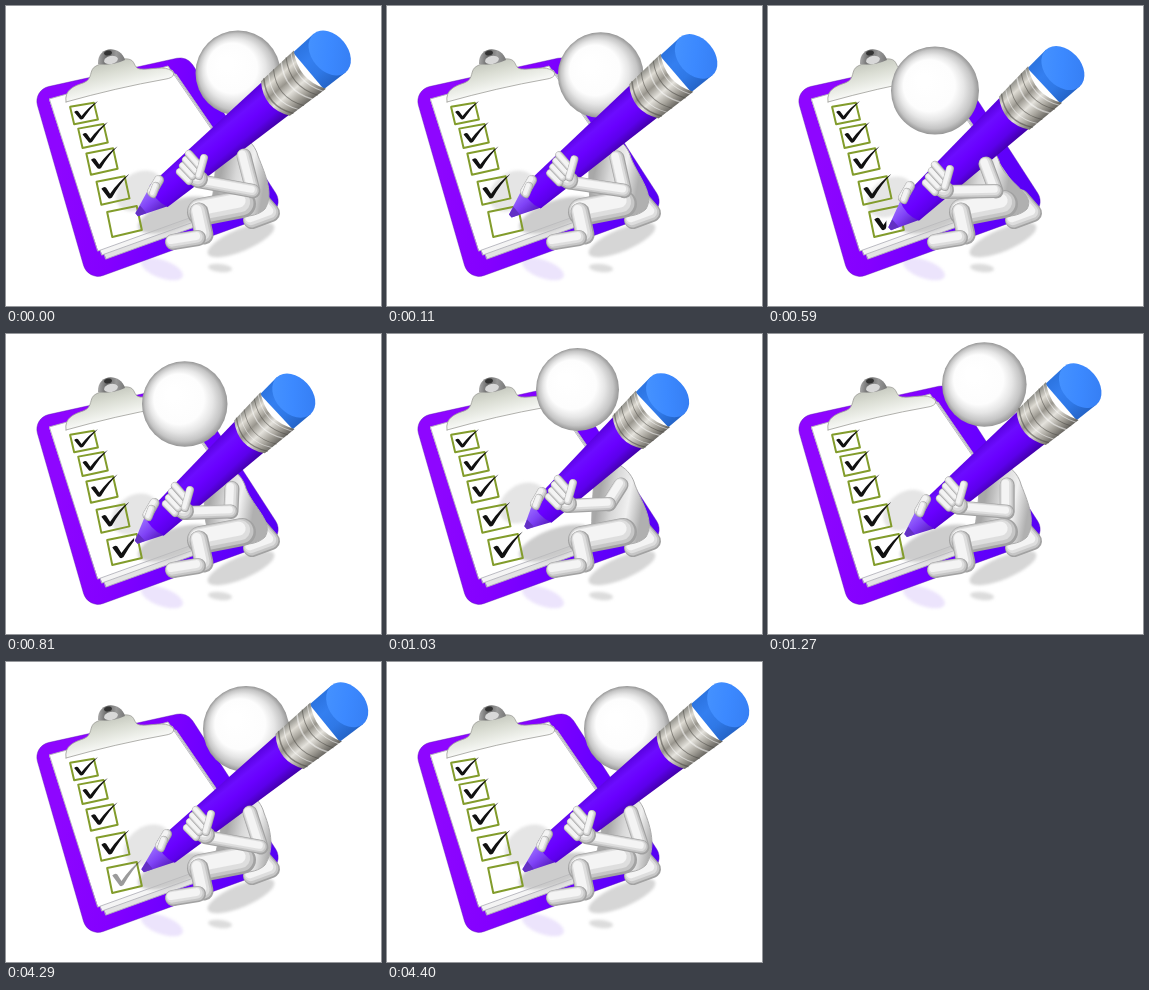
These frames come from a looping animation (375 by 300 pixels, 6.4 s). An HTML page with a canvas:

```html
<!DOCTYPE html>
<html lang="en">
<head>
<meta charset="utf-8">
<title>Checklist</title>
<style>
html, body { margin: 0; width: 100%; height: 100%; overflow: hidden; background: #fff; }
canvas { display: block; width: 375px; height: 300px; }
</style>
</head>
<body>
<canvas id="stage" width="375" height="300"></canvas>
<script>
const ctx = document.getElementById('stage').getContext('2d');
const LOOP = 6400;
const STEPS = [0, 110, 220, 330, 480, 590, 700, 810, 920, 1030, 1160, 1270, 1380, 1490, 4290, 4400];

// head is x, y, radius; every other part is a point
const POSES = [
  { t: 0, tip: [130, 208], eraser: [315, 53], head: [232, 67, 42.5], hand: [184, 160], grip: [149, 180], shoulder: [234, 142], elbow: [247, 185] },
  { t: 330, tip: [108, 212], eraser: [272, 63], head: [177, 73.5, 43.5], hand: [152, 164], grip: [125, 180], shoulder: [210, 148], elbow: [218, 184] },
  { t: 590, tip: [121, 222], eraser: [287, 68], head: [167, 84.5, 44], hand: [168, 171], grip: [138, 186], shoulder: [214, 150], elbow: [228, 185] },
  { t: 1030, tip: [138, 193], eraser: [274, 66], head: [190.5, 55.5, 41.5], hand: [172, 157], grip: [151, 164], shoulder: [230, 143], elbow: [222, 170] },
  { t: 1490, tip: [136, 208], eraser: [332, 49], head: [240, 67, 43], hand: [191, 160], grip: [157, 178], shoulder: [240, 143], elbow: [255, 185] }
];

const mix = (a, b, k) => a + (b - a) * k;
const clamp = v => Math.max(0, Math.min(1, v));

function poseAt(t) {
  const last = POSES.length - 1;
  let i = 0;
  while (i < last - 1 && t >= POSES[i + 1].t) i++;
  const a = POSES[i], b = POSES[i + 1];
  const k = clamp((t - a.t) / (b.t - a.t));
  const pose = {};
  for (const part in a) {
    if (part !== 't') pose[part] = a[part].map((v, n) => mix(v, b[part][n], k));
  }
  // the head rises while the figure leans back
  if (i === last - 1) pose.head[1] -= 11 * Math.sin(Math.PI * k);
  return pose;
}

function gradient(x0, y0, x1, y1, ...colors) {
  const g = ctx.createLinearGradient(x0, y0, x1, y1);
  colors.forEach((c, i) => g.addColorStop(i / (colors.length - 1), c));
  return g;
}

function outline(color, width) {
  ctx.lineWidth = width;
  ctx.strokeStyle = color;
  ctx.stroke();
}

function polygon(points, fill) {
  ctx.beginPath();
  points.forEach(p => ctx.lineTo(p[0], p[1]));
  ctx.closePath();
  if (fill) { ctx.fillStyle = fill; ctx.fill(); }
}

function roundPolygon(points, radius, fill) {
  const n = points.length, [a, b] = [points[n - 1], points[0]];
  ctx.beginPath();
  ctx.moveTo((a[0] + b[0]) / 2, (a[1] + b[1]) / 2);
  points.forEach((p, i) => ctx.arcTo(...p, ...points[(i + 1) % n], radius));
  ctx.closePath();
  ctx.fillStyle = fill;
  ctx.fill();
}

function ellipse(x, y, rx, ry, angle, fill) {
  ctx.beginPath();
  ctx.ellipse(x, y, rx, ry, angle, 0, Math.PI * 2);
  ctx.fillStyle = fill;
  ctx.fill();
}

function limb(points, width) {
  ctx.lineCap = ctx.lineJoin = 'round';
  const layers = [[0, 0, '#a2a2a2'], [.12, .03, '#c6c6c6'], [.28, .07, '#dedede'], [.5, .12, '#f4f4f4']];
  for (const [inset, shift, color] of layers) {
    ctx.beginPath();
    points.forEach(p => ctx.lineTo(p[0] - shift * width, p[1] - shift * width));
    outline(color, width * (1 - inset));
  }
}

function floorShadow() {
  ctx.save();
  ctx.filter = 'blur(1.5px)';
  ellipse(156, 263, 22, 9, .35, '#ece4fc');
  ellipse(214, 262, 12, 4, .1, '#dcdcdc');
  ellipse(235, 234, 36, 11, -.4, '#d6d6d6');
  ctx.restore();
}

function board() {
  roundPolygon([[27, 84], [181, 50], [280, 203], [82, 275]], 15,
    gradient(50, 150, 270, 200, '#8e06ff', '#8400ff', '#6600ff', '#5600f4'));
  outline('rgba(85,20,175,.4)', 1);
  const sheet = (d, fill) => {
    polygon([[43 + d, 93 + d], [162 + d, 60 + d], [250 + d, 188 + d], [92 + d, 245 + d]], fill);
    outline('#b4b4bc', .9);
  };
  sheet(8, '#e2e2e2');
  sheet(4, '#f4f4f4');
  sheet(0, '#fff');
}

function clip() {
  ctx.beginPath();
  ctx.moveTo(60, 96);
  ctx.bezierCurveTo(58, 84, 68, 80, 77, 77);
  ctx.bezierCurveTo(88, 73, 82, 64, 90, 60);
  ctx.bezierCurveTo(98, 56, 112, 52, 122, 53);
  ctx.bezierCurveTo(130, 54, 127, 62, 134, 63);
  ctx.bezierCurveTo(146, 64, 158, 59, 166, 65);
  ctx.bezierCurveTo(170, 69, 166, 72, 160, 73);
  ctx.bezierCurveTo(126, 79, 92, 87, 60, 96);
  ctx.fillStyle = gradient(105, 54, 113, 88, '#c3c6bc', '#d9dcd2', '#eceee8', '#fff');
  ctx.fill();
  outline('#9d9d98', .8);
  ctx.beginPath();
  ctx.moveTo(92, 58);
  ctx.bezierCurveTo(91, 39, 115, 39, 119, 54);
  ctx.quadraticCurveTo(106, 60, 92, 58);
  ctx.fillStyle = gradient(92, 50, 119, 52, '#aaa', '#666', '#999', '#777');
  ctx.fill();
  ellipse(105, 54, 7, 4, -.2, '#d8d8d8');
  ellipse(102, 47, 4, 2.4, -.2, '#333');
}

const CENTERS = [[78, 107.5], [87, 130], [96, 155.5], [107, 184.5], [118.5, 215.5]];

function inBox(i, trace) {
  ctx.save();
  ctx.translate(...CENTERS[i]);
  ctx.scale(.82 + .05 * i, .7 + .075 * i);
  trace();
  ctx.restore();
}

function box(i) {
  inBox(i, () => polygon([[-17, -9.5], [12, -15.5], [17, 8.5], [-12, 15.5]]));
  ctx.lineJoin = 'round';
  outline('#829c2b', 2);
}

function check(i, progress, alpha) {
  if (!progress || !alpha) return;
  ctx.save();
  ctx.globalAlpha = alpha;
  inBox(i, () => {
    ctx.beginPath();
    ctx.rect(-14, -24, 33 * progress, 40);
    ctx.clip();
    ctx.beginPath();
    ctx.moveTo(-12, -2);
    ctx.quadraticCurveTo(-9, -5, -7, -3);
    ctx.lineTo(-3, 3.5);
    ctx.quadraticCurveTo(6, -10, 17, -18);
    ctx.quadraticCurveTo(7, -7, -1, 7.5);
    ctx.quadraticCurveTo(-4, 10, -5.5, 7);
    ctx.closePath();
    ctx.fillStyle = '#111';
    ctx.fill();
  });
  ctx.restore();
}

function paperShade({ grip: [x, y] }) {
  ctx.save();
  ctx.filter = 'blur(1.5px)';
  ellipse(x - 16, y + 5, 25, 18, -.6, 'rgba(208,208,208,.55)');
  ellipse(168, 209, 38, 14, -.35, 'rgba(188,188,188,.75)');
  ctx.restore();
}

function head([x, y, r]) {
  const g = ctx.createRadialGradient(x - 12, y - 10, 6, x, y, r);
  [[0, '#fff'], [.52, '#fdfdfd'], [.7, '#e6e6e6'], [.88, '#c4c4c4'], [1, '#969696']]
    .forEach(stop => g.addColorStop(...stop));
  ellipse(x, y, r, r, 0, g);
}

function body({ shoulder: [x, y] }) {
  limb([[252, 192], [265, 207], [246, 214]], 18);
  ctx.beginPath();
  ctx.moveTo(x - 22, y - 10);
  ctx.bezierCurveTo(x - 4, y - 22, x + 14, y - 8, x + 18, y + 8);
  ctx.bezierCurveTo(x + 26, y + 28, 268, 188, 259, 203);
  ctx.bezierCurveTo(248, 214, 222, 212, 205, 202);
  ctx.bezierCurveTo(x - 26, y + 42, x - 24, y + 14, x - 22, y - 10);
  ctx.fillStyle = gradient(x - 18, y + 20, x + 26, y + 28, '#a8a8a8', '#d8d8d8', '#f0f0f0', '#b0b0b0');
  ctx.fill();
  outline('#acacac', 1);
  limb([[236, 198], [195, 206]], 28);
  limb([[193, 206], [198, 229]], 19);
  limb([[192, 232], [167, 236]], 16);
}

function pencil({ tip, eraser }) {
  const dx = eraser[0] - tip[0], dy = eraser[1] - tip[1];
  const scale = Math.hypot(dx, dy) / 252;
  // rims keep their depth while the length is foreshortened
  const rim = 10 / scale;
  ctx.save();
  ctx.translate(...tip);
  ctx.rotate(Math.atan2(dy, dx));
  ctx.translate(0, 1);
  ctx.scale(scale, 1);

  polygon([[0, -2], [32, -14], [32, 14], [0, 2]],
    gradient(0, -12, 0, 12, '#9a6cff', '#7f42f6', '#5a20c4'));
  polygon([[0, -2], [9, -5], [9, 5], [0, 2]], '#6330c4');

  ctx.beginPath();
  ctx.moveTo(30, -14);
  ctx.lineTo(194, -21.5);
  ctx.lineTo(194, 21.5);
  ctx.lineTo(30, 14);
  ctx.quadraticCurveTo(23, 0, 30, -14);
  ctx.fillStyle = gradient(0, -21, 0, 21, '#5700dc', '#6c0cff', '#6900ff', '#5c00eb', '#4100a8');
  ctx.fill();

  ctx.beginPath();
  ctx.moveTo(234, -24);
  ctx.lineTo(263, -25);
  ctx.lineTo(263, 25);
  ctx.lineTo(234, 24);
  ctx.closePath();
  ctx.fillStyle = gradient(0, -25, 0, 25, '#2b73df', '#347ff0', '#2f78e6', '#2463c6');
  ctx.fill();
  ellipse(263, 0, 1.8 * rim, 25, 0, gradient(246, -18, 278, 18, '#4592ff', '#3c89ff', '#367ff4'));

  // metal sleeve
  ctx.beginPath();
  ctx.moveTo(189, -22.5);
  ctx.lineTo(236, -25);
  ctx.quadraticCurveTo(236 - 1.6 * rim, 0, 236, 25);
  ctx.lineTo(189, 22.5);
  ctx.quadraticCurveTo(189 - 1.6 * rim, 0, 189, -22.5);
  ctx.fillStyle = gradient(0, -25, 0, 25, '#85857f', '#dedbd3', '#99968e', '#e4e2dc', '#a5a29a', '#62605b');
  ctx.fill();
  for (let n = 0; n < 6; n++) {
    const u = 193 + n * 7 + (n > 2 ? 4 : 0), w = 22.5 + n * .5;
    ctx.beginPath();
    ctx.moveTo(u, -w);
    ctx.quadraticCurveTo(u - 1.6 * rim, 0, u, w);
    outline(n % 2 ? 'rgba(255,255,255,.5)' : 'rgba(75,73,68,.55)', n % 3 ? 1 : 1.6);
  }
  ctx.restore();
}

function hands({ hand: [x, y], grip: [gx, gy], elbow, shoulder }) {
  limb([[gx + 4, gy - 6], [gx - 3, gy + 6]], 10);
  limb([[gx + 1, gy], [gx - 2, gy + 8]], 8);
  limb([[shoulder[0] + 4, shoulder[1] + 8], elbow], 15);
  limb([elbow, [x + 8, y + 15]], 14);
  limb([[x, y + 8], [x + 9, y + 13]], 18);
  for (let n = 0; n < 4; n++) {
    limb([[x - 10 + n * 3, y + 6 - n * 6], [x - 1 + n * 3.5, y + 15 - n * 5]], 8);
  }
  limb([[x + 9, y + 10], [x + 14, y - 8]], 8);
}

function draw(time) {
  const t = STEPS.filter(s => s <= time).pop();
  const pose = poseAt(t);
  const progress = t < 480 ? 0 : t < 590 ? .2 : clamp(mix(.42, 1, (t - 590) / 440));
  const alpha = t >= 4400 ? 0 : t >= 4290 ? .42 : 1;

  ctx.fillStyle = '#fff';
  ctx.fillRect(0, 0, 375, 300);
  floorShadow();
  board();
  paperShade(pose);
  clip();
  CENTERS.forEach((_, i) => {
    box(i);
    check(i, i < 4 ? 1 : progress, i < 4 || t < 480 ? 1 : alpha);
  });
  head(pose.head);
  body(pose);
  pencil(pose);
  hands(pose);
}

const start = performance.now();
function tick() {
  draw((performance.now() - start) % LOOP);
  requestAnimationFrame(tick);
}
tick();
</script>
</body>
</html>
```
